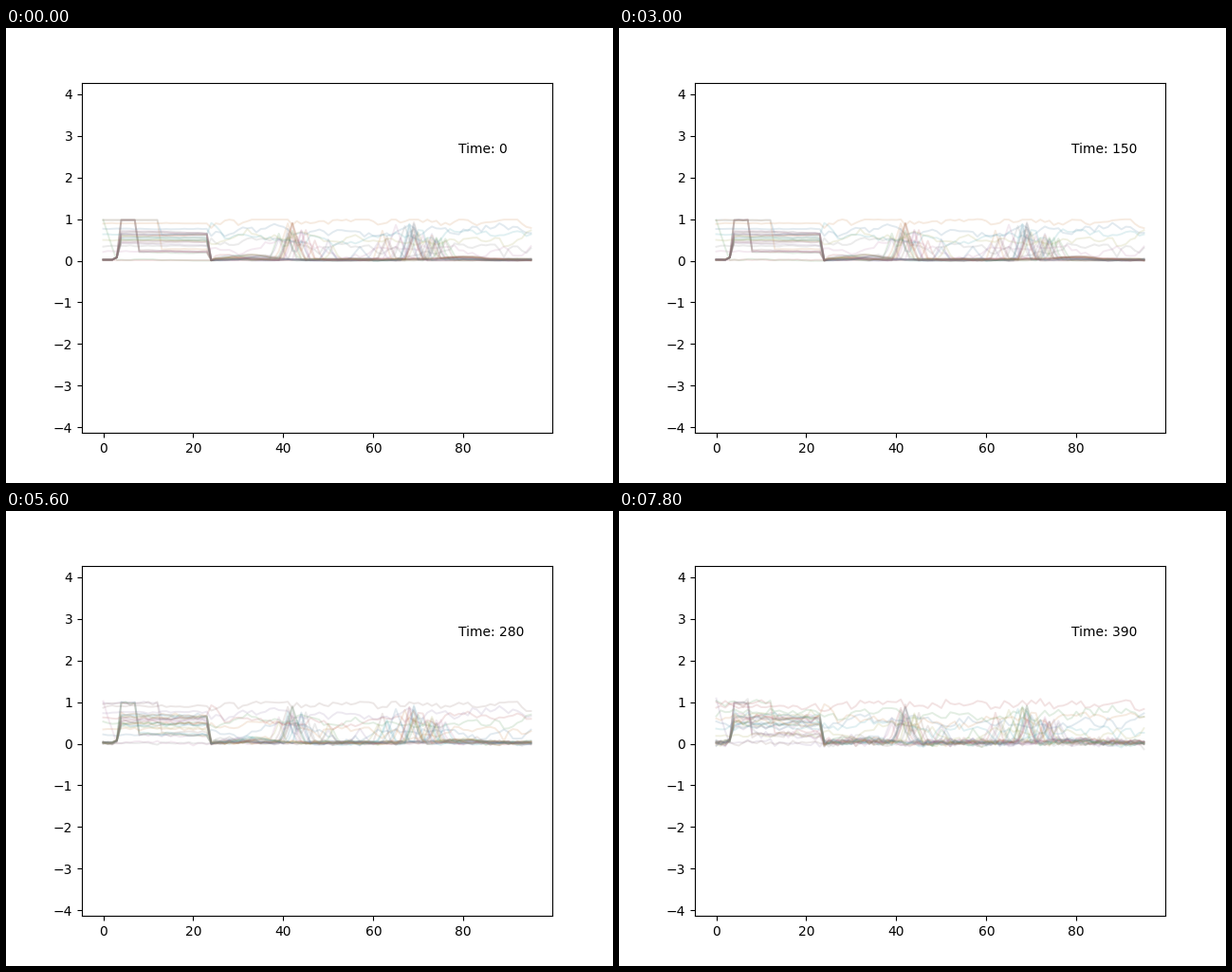
Recreate the animation shown at these times as a matplotlib script. Size 640x480 px, loop 8 s.

```python
import numpy as np
import matplotlib.pyplot as plt
from matplotlib.animation import FuncAnimation
from matplotlib.colors import to_rgb

FRAMES, STEP, INTERVAL = 40, 10, 200
COUNT, SIZE = 28, 96
WANDERERS = 6
rng = np.random.default_rng(11)
x = np.arange(SIZE)


def bell(centre, width):
    return np.exp(-((x - centre) / width) ** 2)


def walk(level, spread):
    """Random walk that is pulled back to its level."""
    y = np.full(SIZE, level)
    for i in range(1, SIZE):
        y[i] = y[i - 1] + 0.2 * (level - y[i - 1]) + rng.normal(0, spread)
    return y


# Tallest spikes stand around 42 and 68
reach = 0.6 * (x > 38) * (x < 78) + 0.4 * bell(42, 3) + 0.4 * bell(67, 5)


def idle():
    """Low floor with a hump near 31 and a few sharp spikes."""
    y = walk(rng.uniform(0.01, 0.05), 0.007)
    y += rng.uniform(0, 0.15) * bell(rng.uniform(27, 36), 4)
    y += rng.uniform(0, 0.08) * bell(80, 5)
    centres = np.append(rng.integers(39, 78, 2), rng.normal([42, 68, 73], [2, 3, 2]).round())
    for c in centres[rng.random(len(centres)) < 0.65].astype(int):
        height = reach[c] * rng.uniform(0.5, 1)
        y = np.maximum(y, height * (1 - abs(x - c) / rng.uniform(1.5, 2.8)))
    return y


def plateau(level, full_from=4, full_to=4):
    """Step up at 4 and down at 24, with an optional full stretch first."""
    y = idle()
    y[:4] = 0.025 + 0.055 * (x[:4] == 3)
    y[4:24] = level + np.cumsum(rng.normal(-0.001, 0.006, 20))
    y[full_from:full_to] = 0.98
    y[24] = 0.01
    return y


def wanderer(level):
    """Flat until 24, then roams around its level."""
    y = walk(level, 0.06)
    y[:24] = level + rng.normal(0, 0.006, 24)
    return y


def build():
    rows = [plateau(0.64, 0, 13), plateau(0.25, 0, 13)]
    rows += [plateau(low, 4, 8) for low in np.linspace(0.21, 0.27, 4)]
    rows += [wanderer(level) for level in np.linspace(0.22, 0.9, WANDERERS)]
    rows.append(np.maximum(idle(), 0.98 - x / 3))
    rows.append(np.full(SIZE, 0.02))
    rows += [plateau(level) for level in np.linspace(0.42, 0.72, COUNT - len(rows))]
    return np.clip(rows, 0.003, 0.99)


def muted(name):
    return 0.6 * np.array(to_rgb(name)) + 0.4 * 0.45


clean = build()
colors = [muted(f"C{i}") for i in range(10)]

# Noise builds up step by step
sigma = 0.04 * (np.arange(FRAMES) / (FRAMES - 1)) ** 2.2
gain = np.sqrt(np.diff(sigma ** 2, prepend=0))
noise = np.cumsum(gain[:, None, None] * rng.normal(size=(FRAMES, COUNT, SIZE)), axis=0)

fig, ax = plt.subplots(figsize=(6.4, 4.8), dpi=100)
ax.set_xlim(-4.75, 99.75)
ax.set_ylim(-4.138, 4.282)
lines = [ax.plot(x, row, lw=1.4, alpha=0.15)[0] for row in clean]
label = ax.text(0.8, 0.8, "", transform=ax.transAxes)


def draw(i):
    # The colour cycle carries on from one frame to the next
    for k, line in enumerate(lines):
        line.set_ydata(clean[k] + noise[i, k])
        line.set_color(colors[(k + i * COUNT) % 10])
    label.set_text(f"Time: {i * STEP}")
    return lines + [label]


anim = FuncAnimation(fig, draw, frames=FRAMES, interval=INTERVAL,
                     init_func=lambda: draw(0), repeat=True, repeat_delay=0)
plt.show()
```
